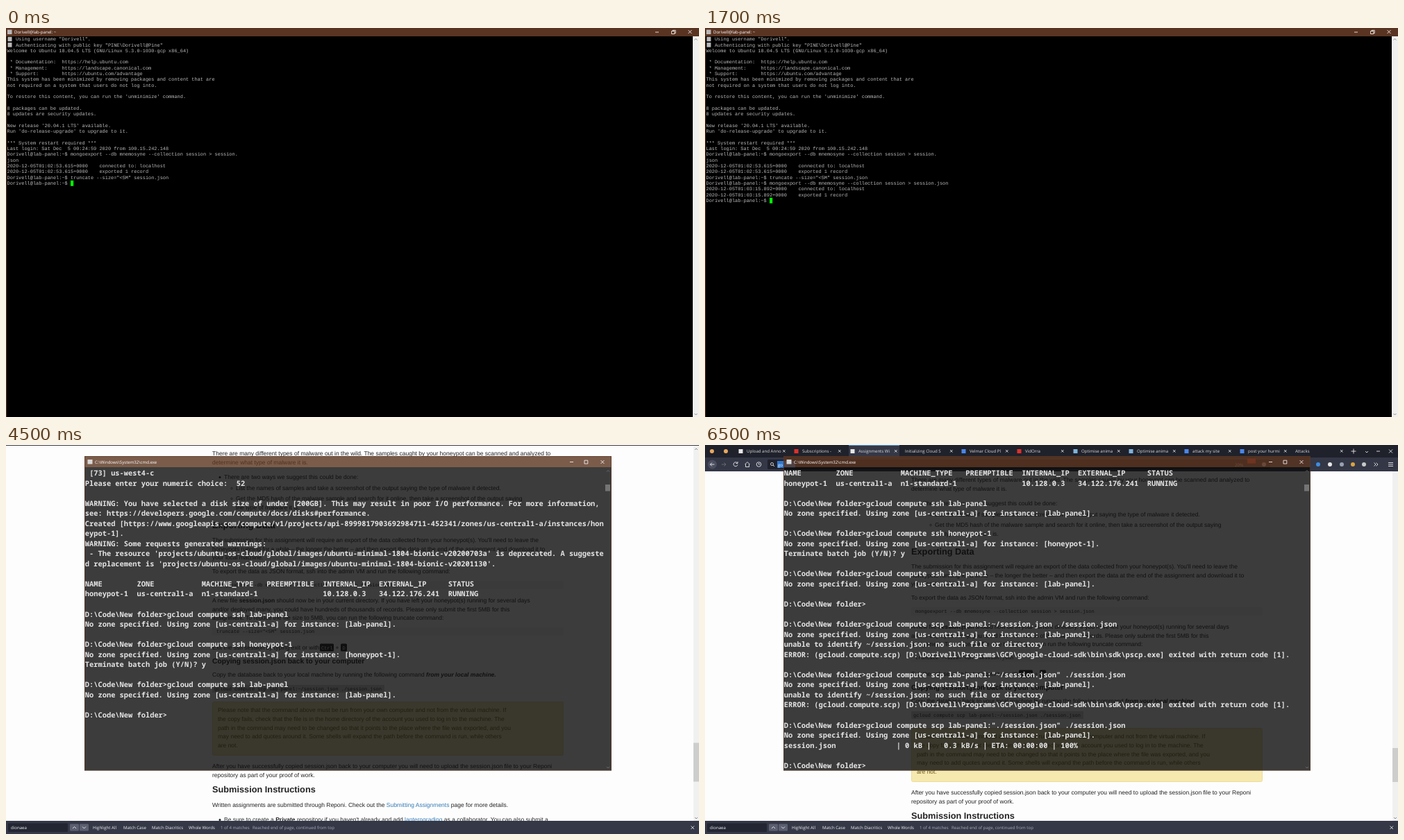
Recreate the animation shown at these times as an HTML page. Size 998x561 px, loop 8 s.

```html
<!DOCTYPE html>
<html lang="en">
<head>
<meta charset="utf-8">
<title>Terminal session</title>
<style>
html, body { margin: 0; width: 100%; height: 100%; overflow: hidden; background: #000; }
svg { display: block; width: 998px; height: 561px; }
text { white-space: pre; text-rendering: geometricPrecision; }
.ui { font: 6.1px "Open Sans", "Noto Sans", sans-serif; fill: #fff; }
.putty { font: 6.93px "Liberation Mono", monospace; fill: #bbb; }
.cmd { font: 600 10.39px "Noto Sans Mono", "DejaVu Sans Mono", monospace; fill: #e4e4e4; }
.page { font: 8.5px "Liberation Sans", Arial, sans-serif; fill: #222; }
.page .h2 { font-size: 12.75px; font-weight: bold; }
.page .h3 { font-size: 10.25px; font-weight: bold; }
.page .code { font: 6.93px "Liberation Mono", monospace; }
.page .note { fill: #6d5a1c; }
.page .link { fill: #337ab7; }
.b { font-weight: bold; }
.line { fill: none; stroke: #fff; stroke-width: .8; }
.grey { stroke: #777; }

.anim { animation: 8s step-end infinite; }
.until1 { animation-name: until1; }
.from1 { animation-name: from1; }
.only1 { animation-name: only1; }
.from2 { animation-name: from2; }
.until3 { animation-name: until3; }
.until4 { animation-name: until4; }
.from4 { animation-name: from4; }
.scroll { animation-name: scroll; }
@keyframes until1 { 0% { opacity: 1 } 6.25%, 100% { opacity: 0 } }
@keyframes from1 { 0% { opacity: 0 } 6.25%, 100% { opacity: 1 } }
@keyframes only1 { 0% { opacity: 0 } 6.25% { opacity: 1 } 31.25%, 100% { opacity: 0 } }
@keyframes from2 { 0% { opacity: 0 } 31.25%, 100% { opacity: 1 } }
@keyframes until3 { 0% { opacity: 1 } 56.25%, 100% { opacity: 0 } }
@keyframes until4 { 0% { opacity: 1 } 81.25%, 100% { opacity: 0 } }
@keyframes from4 { 0% { opacity: 0 } 81.25%, 100% { opacity: 1 } }
@keyframes scroll { 0% { transform: translateY(0) } 81.25%, 100% { transform: translateY(38px) } }
</style>
</head>
<body>
<svg viewBox="0 0 998 561" xmlns="http://www.w3.org/2000/svg">
  <!-- web page -->
  <rect width="998" height="561" fill="#fdfdfd"/>
  <g class="page anim scroll">
    <text x="297" y="15">There are many different types of malware out in the wild. The samples caught by your honeypot can be scanned and analyzed to</text>
    <text x="297" y="27.5">determine what type of malware it is.</text>
    <circle cx="308" cy="46.5" r="1.5"/>
    <text x="314" y="49">There are two ways we suggest this could be done:</text>
    <circle cx="325" cy="62.5" r="1.3" fill="none" stroke="#222" stroke-width=".6"/>
    <text x="331" y="65">List the names of samples and take a screenshot of the output saying the type of malware it detected.</text>
    <circle cx="325" cy="77.5" r="1.3" fill="none" stroke="#222" stroke-width=".6"/>
    <text x="331" y="80">Get the MD5 hash of the malware sample and search for it online, then take a screenshot of the output saying</text>
    <text x="331" y="93">the type of malware it is.</text>
    <text class="h2" x="297" y="120">Exporting Data</text>
    <text x="297" y="140">The submission for this assignment will require an export of the data collected from your honeypot(s). You'll need to leave the</text>
    <text x="297" y="152.5">honeypots running for a while – the longer the better – and then export the data at the end of the assignment and download it to</text>
    <text x="297" y="165">your local machine.</text>
    <text x="297" y="185">To export the data as JSON format, ssh into the admin VM and run the following command:</text>
    <rect x="297" y="196" width="506" height="12" fill="#f5f5f5"/>
    <text class="code" x="303" y="204">mongoexport --db mnemosyne --collection session &gt; session.json</text>
    <text x="297" y="227">A new file <tspan class="b">session.json</tspan> should now be in your current directory. If you have left your honeypot(s) running for several days</text>
    <text x="297" y="239.5">and/or deployed many, you could have hundreds of thousands of records. Please only submit the first 5MB for this</text>
    <text x="297" y="252">assignment. To reduce the file size to 5MB, you can run the following truncate command:</text>
    <rect x="297" y="263" width="506" height="12" fill="#f5f5f5"/>
    <text class="code" x="303" y="271">truncate --size="&lt;5M" session.json</text>
    <text x="297" y="295">Exit the ssh session by typing exit or with</text>
    <rect x="452" y="286.5" width="20" height="11" rx="1.5" fill="#222"/>
    <rect x="482" y="286.5" width="9" height="11" rx="1.5" fill="#222"/>
    <text class="code" x="454" y="294.5" style="fill:#fff">Ctrl</text>
    <text x="474.5" y="295">+</text>
    <text class="code" x="484.5" y="294.5" style="fill:#fff">D</text>
    <text class="h3" x="297" y="315">Copying session.json back to your computer</text>
    <text x="297" y="334">Copy the database back to your local machine by running the following command <tspan class="b" font-style="italic">from your local machine.</tspan></text>
    <rect x="297" y="346" width="248" height="11" fill="#d8d8d8"/>
    <text class="code" x="300" y="353.5">gcloud compute scp lab-panel:~/session.json ./session.json</text>
    <rect x="297.5" y="370.5" width="505" height="77" rx="2" fill="#f6e9b0" stroke="#ecdc98"/>
    <g class="note">
      <text x="305" y="385">Please note that the command above must be run from your own computer and not from the virtual machine. If</text>
      <text x="305" y="398">the copy fails, check that the file is in the home directory of the account you used to log in to the machine. The</text>
      <text x="305" y="410.5">path in the command may need to be changed so that it points to the place where the file was exported, and you</text>
      <text x="305" y="423">may need to add quotes around it. Some shells will expand the path before the command is run, while others</text>
      <text x="305" y="436">are not.</text>
    </g>
    <text x="297" y="466">After you have successfully copied session.json back to your computer you will need to upload the session.json file to your Reponi</text>
    <text x="297" y="478.5">repository as part of your proof of work.</text>
    <text class="h2" x="297" y="501">Submission Instructions</text>
    <text x="297" y="521.5">Written assignments are submitted through Reponi. Check out the <tspan class="link">Submitting Assignments</tspan> page for more details.</text>
    <circle cx="308" cy="540.5" r="1.5"/>
    <text x="314" y="543">Be sure to create a <tspan class="b">Private</tspan> repository if you haven't already and add <tspan class="link" text-decoration="underline">lanterngrading</tspan> as a collaborator. You can also submit a</text>
  </g>
  <rect x="990" width="8" height="542" fill="#f0f0f0"/>
  <rect class="anim until4" x="990" y="429.5" width="8" height="56" fill="#cdcdcd"/>
  <rect class="anim from4" x="990" y="437" width="8" height="49" fill="#cdcdcd"/>
  <path class="line grey" d="M992 537l2 2 2-2"/>
  <g class="anim until4">
    <rect width="998" height="1" fill="#3a3c48"/>
    <path class="line grey" d="M992 7l2-2 2 2"/>
  </g>

  <!-- browser bars -->
  <g id="chrome" class="ui anim from4">
    <rect width="998" height="18" fill="#1f212b"/>
    <rect y="18" width="998" height="20" fill="#343746"/>
    <rect x="207" width="73" height="18" fill="#343746"/>
    <rect x="207" width="73" height="1" fill="#4c9be8"/>
    <rect x="90" y="21" width="724" height="14" rx="1.5" fill="#20222c"/>
    <rect x="104" y="23" width="26" height="10" fill="#2f78d0"/>
    <text x="105" y="30.5">go</text>
    <circle class="line" cx="96.5" cy="27.5" r="2"/>
    <path class="line" d="M98 29l2 2"/>
    <circle cx="10.5" cy="28" r="6.5" fill="#4b4e5e"/>
    <path class="line" d="M13.5 28h-6m2.5-2.5L7.5 28l2.5 2.5"/>
    <path class="line grey" d="M24 28h6m-2.5-2.5L30 28l-2.5 2.5"/>
    <path class="line" d="M46.5 26a3 3 0 1 0 .5 2.5M47 24v2.5h-2.5"/>
    <path class="line" d="M57.5 28l3.5-3.5 3.5 3.5M58.5 27.5v4h5v-4"/>
    <circle class="line" cx="77.5" cy="28" r="3.3"/>
    <path class="line" d="M77.5 26v2h1.5"/>
    <rect x="781" y="19.5" width="12" height="7" fill="#c43a2c"/>
    <text x="763" y="30.5" fill="#bbb">20%</text>
    <path class="line" d="M930.5 9h7M934 5.5v7M951 9l2 2 2-2M967 9h5M985 6.5l5 5m0-5l-5 5M984 25.5h7m-7 2.5h7m-7 2.5h7M963.5 25.5l2.5 2.5-2.5 2.5m3-5l2.5 2.5-2.5 2.5"/>
  </g>

  <!-- find bar -->
  <g id="find" class="ui">
    <rect y="542" width="998" height="19" fill="#343847"/>
    <rect x="3" y="545.5" width="86" height="12.5" rx="1" fill="#232632"/>
    <rect x="92" y="546.5" width="13" height="10" rx="1" fill="#5b5f70"/>
    <rect x="106" y="546.5" width="13" height="10" rx="1" fill="#5b5f70"/>
    <path class="line" d="M96 553l2.5-2.5L101 553M110 550.5l2.5 2.5 2.5-2.5M986.5 549.5l4.5 4.5m0-4.5l-4.5 4.5"/>
  </g>

  <!-- command window -->
  <rect x="113" y="16" width="759" height="16" fill="#5a341f" fill-opacity=".8"/>
  <rect x="113" y="32" width="759" height="437.5" fill="#0c0c0c" fill-opacity=".8"/>
  <rect x="113.5" y="16.5" width="758" height="452.5" fill="none" stroke="#5a3a28" stroke-opacity=".7"/>
  <rect x="117.5" y="21" width="7" height="6.5" fill="#d8d8d8"/>
  <text class="ui" x="128" y="26.8">C:\Windows\System32\cmd.exe</text>
  <path class="line" d="M812 24.5h5M833 22.2h4.8v4.8h-4.8zM856.5 22l5 5m0-5l-5 5"/>
  <rect x="863" y="57" width="7" height="9.5" fill="#747474"/>
  <path class="line grey" d="M865 38.5l2-2 2 2M865 464l2 2 2-2"/>
  <g id="cmdA" class="cmd anim until4"></g>
  <g id="cmdB" class="cmd anim from4"></g>

  <!-- ssh terminal -->
  <g class="anim until3">
    <rect width="998" height="561"/>
    <rect width="998" height="12" fill="#5a3422"/>
    <rect y="12" width="1" height="549" fill="#5a3422"/>
    <rect x="2" y="2.5" width="6.5" height="6.5" fill="#b9b9b9"/>
    <text class="ui" x="12" y="8.3">Dorivell@lab-panel: ~</text>
    <path class="line" d="M935 6h5M960 4.5v-1.2h4.2v4.2h-1.2M958.5 4.5h4.3v4h-4.3zM982.5 3l5 5m0-5l-5 5"/>
    <rect x="989" y="12" width="9" height="549" fill="#f0f0f0"/>
    <path class="line grey" d="M991.5 17.5l2-2 2 2M991.5 556l2 2 2-2"/>
    <rect x="2.5" y="12.8" width="6" height="6.5" fill="#b9b9b9"/>
    <rect x="2.5" y="21.1" width="6" height="6.5" fill="#b9b9b9"/>
    <g id="putty" class="putty"></g>
  </g>
</svg>
<script>
const byId = id => document.getElementById(id);

function add(parent, tag, attrs, text = '') {
  const el = document.createElementNS('http://www.w3.org/2000/svg', tag);
  for (const key in attrs) el.setAttribute(key, attrs[key]);
  el.textContent = text;
  return parent.appendChild(el);
}

function print(parent, lines, x, y, step) {
  lines.forEach((line, i) => line && add(parent, 'text', { x, y: y + i * step }, line));
}

// ssh terminal
const ROW = 8.31, TOP = 18.2;
const prompt = 'Dorivell@lab-panel:~$ ';
const exportCmd = prompt + 'mongoexport --db mnemosyne --collection session > session.';
const truncateCmd = prompt + 'truncate --size="<5M" session.json';
const exported = time => [
  `2020-12-05T01:${time}+0000    connected to: localhost`,
  `2020-12-05T01:${time}+0000    exported 1 record`
];

function block(cls, row, lines) {
  const g = add(byId('putty'), 'g', { class: cls && 'anim ' + cls });
  print(g, lines, 1.5, TOP + row * ROW, ROW);
  return g;
}

function cursor(cls, row) {
  const g = block(cls, row, [prompt]);
  add(g, 'rect', { x: 93, y: TOP + row * ROW - 6.1, width: 4.2, height: 8, fill: '#00f800' });
}

block('', 0, [
  '   Using username "Dorivell".',
  '   Authenticating with public key "PINE\\Dorivell@Pine"',
  'Welcome to Ubuntu 18.04.5 LTS (GNU/Linux 5.3.0-1030-gcp x86_64)',
  '',
  ' * Documentation:  https://help.ubuntu.com',
  ' * Management:     https://landscape.canonical.com',
  ' * Support:        https://ubuntu.com/advantage',
  'This system has been minimized by removing packages and content that are',
  'not required on a system that users do not log into.',
  '',
  "To restore this content, you can run the 'unminimize' command.",
  '',
  '8 packages can be updated.',
  '8 updates are security updates.',
  '',
  "New release '20.04.1 LTS' available.",
  "Run 'do-release-upgrade' to upgrade to it.",
  '',
  '*** System restart required ***',
  'Last login: Sat Dec  5 00:24:59 2020 from 100.15.242.148',
  exportCmd,
  'json',
  ...exported('02:53.615'),
  truncateCmd
]);
cursor('until1', 25);
block('from1', 25, [exportCmd + 'json', ...exported('03:15.892')]);
cursor('only1', 28);
block('from2', 28, [truncateCmd]);
cursor('from2', 29);

// command window
const shell = 'D:\\Code\\New folder>';
const zone = name => `No zone specified. Using zone [us-central1-a] for instance: [${name}].`;
const ssh = name => [shell + 'gcloud compute ssh ' + name, zone(name)];
const scp = path => [shell + `gcloud compute scp lab-panel:${path} ./session.json`, zone('lab-panel')];
const failed = [
  'unable to identify ~/session.json: no such file or directory',
  'ERROR: (gcloud.compute.scp) [D:\\Dorivell\\Programs\\GCP\\google-cloud-sdk\\bin\\sdk\\pscp.exe] exited with return code [1].',
  ''
];
const intro = [
  ' [73] us-west4-c',
  'Please enter your numeric choice:  52',
  '',
  'WARNING: You have selected a disk size of under [200GB]. This may result in poor I/O performance. For more information,',
  'see: https://developers.google.com/compute/docs/disks#performance.',
  'Created [https://www.googleapis.com/compute/v1/projects/api-8999817903692984711-452341/zones/us-central1-a/instances/hon',
  'eypot-1].',
  'WARNING: Some requests generated warnings:',
  " - The resource 'projects/ubuntu-os-cloud/global/images/ubuntu-minimal-1804-bionic-v20200703a' is deprecated. A suggeste",
  "d replacement is 'projects/ubuntu-os-cloud/global/images/ubuntu-minimal-1804-bionic-v20201130'.",
  ''
];
const session = [
  'NAME        ZONE           MACHINE_TYPE   PREEMPTIBLE  INTERNAL_IP  EXTERNAL_IP     STATUS',
  'honeypot-1  us-central1-a  n1-standard-1               10.128.0.3   34.122.176.241  RUNNING',
  '',
  ...ssh('lab-panel'), '',
  ...ssh('honeypot-1'),
  'Terminate batch job (Y/N)? y', '',
  ...ssh('lab-panel'), '',
  shell
];
const copying = [
  '',
  ...scp('~/session.json'), ...failed,
  ...scp('"~/session.json"'), ...failed,
  ...scp('"./session.json"'),
  'session.json'.padEnd(26) + '| 0 kB |   0.3 kB/s | ETA: 00:00:00 | 100%',
  '',
  shell
];
print(byId('cmdA'), [...intro, ...session], 113.8, 44, 14.54);
print(byId('cmdB'), [...session, ...copying], 113.8, 44, 14.54);

// browser tabs: left edge, icon colour, title
const chrome = byId('chrome');
[
  [47, '#e6e6e6', 'Upload and Anno'],
  [127, '#e0302a', 'Subscriptions -'],
  [208, '#e6e6e6', 'Assignments Wi'],
  [288, '', 'Initializing Cloud S'],
  [368, '#4a86e8', 'Velmar Cloud Pl'],
  [448, '#e0302a', 'VidOrra'],
  [529, '#7fb2d9', 'Optimise anima'],
  [609, '#7fb2d9', 'Optimise anima'],
  [689, '#4a86e8', 'attack my site'],
  [769, '#4a86e8', 'post your hurmi'],
  [850, '', 'Attacks']
].forEach(([x, color, title]) => {
  if (color) add(chrome, 'rect', { x: x + 1.5, y: 6, width: 6, height: 6, fill: color });
  add(chrome, 'text', { x: color ? x + 13 : x, y: 11.2, fill: '#ddd' }, title);
  add(chrome, 'path', { class: 'line', d: `M${x + 65} 7l3.5 3.5m0-3.5l-3.5 3.5` });
});
[
  [10, 9, '#e8a860'], [30, 9, '#e8a860'], [805, 28, '#9aa0b0'], [883, 28, '#3f8ee0'],
  [900, 28, '#e8e8e8'], [917, 28, '#9aa0b0'], [933, 28, '#d9a441'], [949, 28, '#c8c8c8']
].forEach(([cx, cy, fill]) => add(chrome, 'circle', { cx, cy, r: 3, fill }));

// find bar labels
[
  [7, 'dionaea'], [125, 'Highlight All'], [169, 'Match Case'], [210, 'Match Diacritics'],
  [263, 'Whole Words'], [309, '1 of 4 matches', '#aab'], [355, 'Reached end of page, continued from top', '#aab']
].forEach(([x, label, fill = '#f2f2f2']) => add(byId('find'), 'text', { x, y: 554.2, fill }, label));
</script>
</body>
</html>
```
